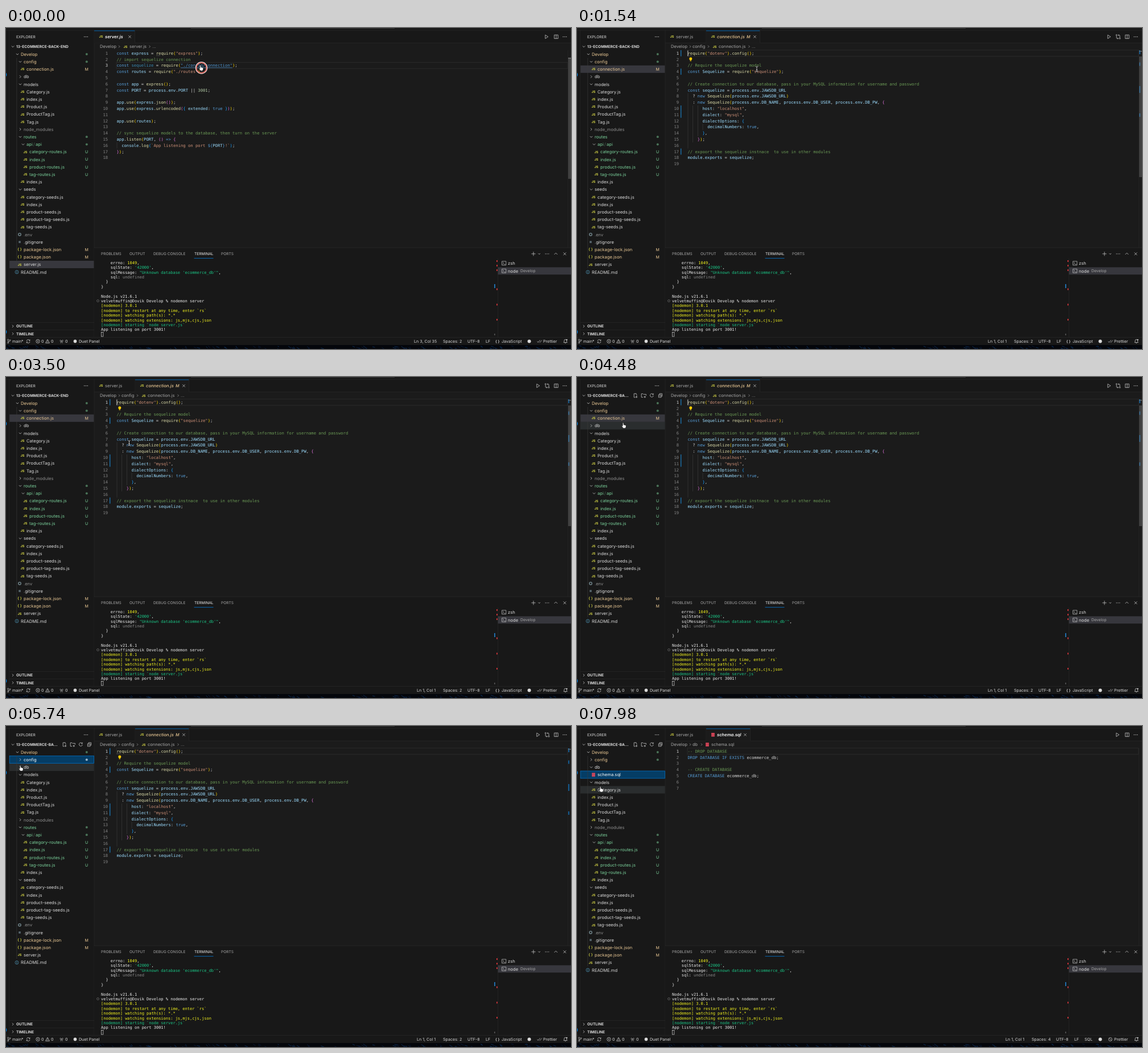
Recreate the animation shown at these times as an HTML page. Size 993x564 px, loop 8000 ms.

```html
<!DOCTYPE html>
<html lang="en">
<head>
<meta charset="utf-8">
<title>Editor walkthrough</title>
<style>
html, body { margin: 0; width: 100%; height: 100%; overflow: hidden; background: #181818; }
svg { display: block; width: 993px; height: 564px; }
text { font-family: Inter, "Open Sans", sans-serif; white-space: pre; text-rendering: geometricPrecision; }
.mono { font-family: "DejaVu Sans Mono", "Liberation Mono", monospace; }
</style>
</head>
<body>
<svg id="stage" viewBox="0 0 993 564"></svg>
<script>
const GREY = '#a6a6a6', LIGHT = '#dadada', YELLOW = '#e8c794', GREEN = '#7ad09a', BLUE = '#0078d4';
const LINE = '#2b2b2b', SIDE = '#181818', EDITOR = '#1b1b1b', JS = '#d6d646';
const ROW = 13.2, TOP = 39.4, CH = 4.334;

const esc = s => s.replace(/&/g, '&amp;').replace(/</g, '&lt;');
const raw = (x, y, s, fill, size = 7.6, attr = '') =>
  `<text x="${x}" y="${(y + size * .36).toFixed(2)}" font-size="${size}" fill="${fill}" ${attr}>${s}</text>`;
const txt = (x, y, s, ...rest) => raw(x, y, esc(s), ...rest);
const rect = (x, y, w, h, fill, attr = '') =>
  `<rect x="${x}" y="${y}" width="${w}" height="${h}" fill="${fill}" ${attr}/>`;
const path = (d, color = LIGHT, w = .7, fill = 'none') =>
  `<path d="${d}" stroke="${color}" stroke-width="${w}" fill="${fill}"/>`;
const dot = (x, y, r, fill, stroke = 'none', w = .7) =>
  `<circle cx="${x}" cy="${y}" r="${r}" fill="${fill}" stroke="${stroke}" stroke-width="${w}"/>`;
const group = (id, body, attr = '') => `<g id="${id}" ${attr}>${body}</g>`;

const down = (x, y, c = LIGHT, k = 2.2) => path(`M${x - k} ${y - k / 2}l${k} ${k} ${k} ${-k}`, c);
const right = (x, y, c = LIGHT, k = 2.2) => path(`M${x - k / 2} ${y - k}l${k} ${k} ${-k} ${k}`, c);
const cross = (x, y, k = 2.2, c = LIGHT) => path(`M${x - k} ${y - k}l${2 * k} ${2 * k}m0 ${-2 * k}l${-2 * k} ${2 * k}`, c);
const more = (x, y, c = LIGHT) => [-2.8, 0, 2.8].map(d => dot(x + d, y, .65, c)).join('');
const js = (x, y) => txt(x, y, 'JS', JS, 5.6, 'font-weight="700" text-anchor="middle"');
const brace = (x, y, c = JS) => txt(x, y - .3, '{ }', c, 6.4, 'font-weight="600" text-anchor="middle"');
const cylinder = (x, y) => [-2.2, 0, 2.2].map(d => rect(x - 3.1, y + d - .9, 6.2, 1.8, '#e5485d', 'rx=".8"')).join('') +
  rect(x - 2.7, y - 3, 5.4, 6, '#e5485d', 'opacity=".45"');

// ---- explorer tree: depth, kind, label, status ----
const tree = `0 v Develop m|1 v config m|2 j connection.js M|1 > db|2 q schema.sql|1 v models|2 j Category.js|2 j index.js
2 j Product.js|2 j ProductTag.js|2 j Tag.js|1 > node_modules -|1 v routes u|2 v api/api u|3 j category-routes.js U
3 j index.js U|3 j product-routes.js U|3 j tag-routes.js U|2 j index.js|1 v seeds|2 j category-seeds.js|2 j index.js
2 j product-seeds.js|2 j product-tag-seeds.js|2 j tag-seeds.js|1 g .env -|1 i .gitignore|1 b package-lock.json M
1 b package.json M|1 j server.js|0 r README.md`.split(/[|\n]/).map(s => s.split(' '));

const icons = {
  v: (x, y) => down(x + 1, y), '>': (x, y) => right(x + 1, y), j: js, b: brace, q: cylinder,
  g: (x, y) => dot(x, y, 2.2, 'none', '#6d8086', 1.5),
  i: (x, y) => rect(x - 1.8, y - 1.8, 3.6, 3.6, '#56656c'),
  r: (x, y) => dot(x, y, 3, 'none', '#519aba') + path(`M${x} ${y - .6}v2.3m0-3.8v.9`, '#519aba', .9)
};

function treeRows(configOpen, dbOpen, selected) {
  const rows = tree.filter(r => (configOpen || r[2] !== 'connection.js') && (dbOpen || r[2] !== 'schema.sql'));
  return rows.map(([depth, kind, label, mark = ''], i) => {
    const x = 26 + 5 * depth, y = 46 + ROW * i, picked = label === selected;
    if (label === 'config' && !configOpen || label === 'db') kind = label === 'db' && dbOpen ? 'v' : '>';
    const color = picked ? '#fff' : { m: YELLOW, M: YELLOW, u: GREEN, U: GREEN, '-': '#8c8c8c' }[mark] || LIGHT;
    const name = label.replace('/', '<tspan dx="1.3" opacity=".5">/</tspan><tspan dx="1.3">') + (label.includes('/') ? '</tspan>' : '');
    let end = '';
    if (/[MU]/.test(mark)) end = txt(141.7, y, mark, color, 7, 'text-anchor="middle"');
    else if (/[mu]/.test(mark)) end = dot(141.8, y, 2, picked ? '#9fb8cb' : '#4a7358');
    return icons[kind](x - 7, y) + raw(x, y, name, color) + end;
  }).join('');
}

// ---- code ----
const TOKEN = /(\/\/.*|-- .*)|("[^"]*"|`[^$]*|!`)|(\$\{|\}(?=!)|=>|\b(?:const|new|true|DROP|CREATE|DATABASE|IF|EXISTS)\b)|(\b\d+\b)|([A-Za-z_]\w*)|([()[\]{}])|(\s+|.)/g;
const PAIRS = ['#ffd700', '#da70d6', '#179fff'];

function wordColor(w, next, dim) {
  if (next === '(') return '#dcdcaa';
  if (dim === w) return '#3a89b2';
  return w === 'ecommerce_db' ? '#d4d4d4' : '#9cdcfe';
}

function code(src, active, dim) {
  let depth = 0;
  return src.split('\n').map((line, i) => {
    const y = 44.3 + 10.8 * i;
    const spans = [...line.matchAll(TOKEN)].map(m => {
      const [s, comment, str, key, num, word, pair] = m;
      let color = '#d4d4d4', attr = '';
      if (comment) color = '#6a9955';
      else if (str) {
        color = '#ce9178';
        if (s.includes('./config')) { color = '#4e94ce'; attr = ' text-decoration="underline"'; }
      }
      else if (key) color = '#569cd6';
      else if (num) color = '#b5cea8';
      else if (word) color = wordColor(s, line[m.index + s.length], dim);
      else if (pair) color = PAIRS[('([{'.includes(s) ? depth++ : --depth) % 3];
      return `<tspan fill="${color}"${attr}>${esc(s)}</tspan>`;
    }).join('');
    const no = txt(179.2, y, String(i + 1), i + 1 === active ? LIGHT : '#858585', 7.2, 'class="mono" text-anchor="end"');
    return no + raw(194.5, y, spans, LIGHT, 7.2, 'class="mono"');
  }).join('');
}
const lineTop = n => 38.9 + 10.8 * (n - 1);
const lineBox = n => rect(194, lineTop(n), 793, 10.8, 'none', 'stroke="#2a2a2a" stroke-width="1"');
const guide = (col, a, b) => rect(194.7 + col * CH, lineTop(a), .6, 10.8 * (b - a + 1), '#404040');
const hint = x => [0, 2.4, 4.8].map(d => rect(x + d, 48.2, 1, .9, '#8a8a8a')).join('');

const serverSrc = `const express = require("express");
// import sequelize connection
const sequelize = require("./config/connection");
const routes = require("./routes");

const app = express();
const PORT = process.env.PORT || 3001;

app.use(express.json());
app.use(express.urlencoded({ extended: true }));

app.use(routes);

// sync sequelize models to the database, then turn on the server
app.listen(PORT, () => {
  console.log(\`App listening on port \${PORT}!\`);
});
`;
const connSrc = `require("dotenv").config();

// Require the sequelize model
const Sequelize = require("sequelize");

// Create connection to our database, pass in your MySQL information for username and password
const sequelize = process.env.JAWSDB_URL
  ? new Sequelize(process.env.JAWSDB_URL)
  : new Sequelize(process.env.DB_NAME, process.env.DB_USER, process.env.DB_PW, {
      host: "localhost",
      dialect: "mysql",
      dialectOptions: {
        decimalNumbers: true,
      },
    });

// expoort the sequelize instnace  to use in other modules
module.exports = sequelize;
`;
const sqlSrc = `-- DROP DATABASE
DROP DATABASE IF EXISTS ecommerce_db;

-- CREATE DATABASE
CREATE DATABASE ecommerce_db;

`;

// ---- tabs, breadcrumbs, editor actions, status ----
const activeTab = (x, w) => rect(x, 4, w, 22.6, EDITOR) + rect(x, 4.5, w, .8, BLUE) +
  rect(x + w - .3, 4, .6, 22, LINE) + cross(x + w - 9, 15.4);
const idleTab = js(167, 15.4) + txt(174, 15.4, 'server.js', GREY) + rect(226.7, 4, .6, 22, LINE);
const italic = w => `font-style="italic" font-weight="${w}"`;
const play = x => path(`M${x - 2.2} 12.2v6.4l5-3.2z`);
const split = path('M963.6 12.2h6.6v6.4h-6.6zM966.9 12.2v6.4') + more(982, 15.4);
const compare = path('M948.2 13v4.4q0 1 1 1h2m-1-1.2l1.2 1.2-1.2 1.2M954 17.8v-4.2q0-1-1-1h-2m1.2-1.2l-1.2 1.2 1.2 1.2') +
  dot(948.2, 12.4, 1, EDITOR, LIGHT, .6) + dot(954, 18.4, 1, EDITOR, LIGHT, .6);
const crumbs = list => list.map(([x, s]) => s === '>' ? right(x, 32.6, GREY, 1.9) : txt(x, 32.6, s, GREY, 7.5)).join('');
const status = list => list.map(([x, s]) => txt(x, 550.4, s, LIGHT, 7.1)).join('');
const jsStatus = pos => status([pos, [768, 'Spaces: 2'], [811, 'UTF-8'], [843, 'LF'], [871, 'JavaScript']]) +
  brace(863.6, 550.6, LIGHT) + path('M933.6 550.6l1.6 1.8 3.4-4m-.8 4l.4.2 3.4-4');

const views = group('server', activeTab(155, 71.5) + js(167, 15.4) + txt(174, 15.4, 'server.js', '#fff', 7.6, italic(600)) +
  play(950) + split + crumbs([[165, 'Develop'], [199, '>'], [217, 'server.js'], [252.5, '>'], [257, '...']]) + js(210, 32.6) +
  lineBox(3) + guide(0, 16, 16) + code(serverSrc, 3, 'sequelize') + hint(264.5) + rect(988, 52.5, 5, 1, '#a0a0a0') +
  jsStatus([717, 'Ln 3, Col 35'])) +
group('conn', idleTab + activeTab(227, 94.5) + js(239, 15.4) + txt(246, 15.4, 'connection.js', YELLOW, 7.6, italic(500)) +
  txt(298, 15.4, 'M', YELLOW, 7.2, italic(500)) + play(935) + compare + split +
  crumbs([[165, 'Develop'], [199, '>'], [203, 'config'], [231, '>'], [249, 'connection.js'], [302.5, '>'], [307, '...']]) + js(242, 32.6) +
  lineBox(1) + guide(0, 8, 16) + guide(2, 10, 15) + guide(4, 10, 14) + guide(6, 13, 13) + code(connSrc, 1) + hint(195) +
  [1, 4, 10, 11, 17].map(n => rect(182, lineTop(n), 1.4, 10.8, '#1b6fa8')).join('') +
  [[39, 7], [60.5, 6], [102, 12], [150, 6]].map(([y, h]) => rect(988, y, 2.2, h, '#14588c')).join('') +
  rect(988, 40.5, 5, .9, '#8a8a8a') + jsStatus([722, 'Ln 1, Col 1'])) +
group('sql', idleTab + activeTab(227, 77.5) + cylinder(239, 15.4) + txt(246, 15.4, 'schema.sql', '#fff', 7.6, italic(600)) +
  play(950) + split + crumbs([[165, 'Develop'], [199, '>'], [203, 'db'], [219, '>'], [236, 'schema.sql']]) + cylinder(229, 32.6) +
  lineBox(1) + code(sqlSrc, 1) +
  status([[753, 'Ln 1, Col 1'], [799, 'Spaces: 4'], [842, 'UTF-8'], [874, 'LF'], [892, 'SQL']]) +
  dot(937.3, 550.5, 3, 'none', LIGHT) + path('M935.2 548.4l4.2 4.2'));

// ---- fixed parts ----
const Y = '#f2f21f', G = '#1bc586', W = '#ececec';
const shell = [
  [['    errno: ', W], ['1049', Y], [',', W]],
  [['    sqlState: ', W], ["'42000'", G], [',', W]],
  [['    sqlMessage: ', W], ['"Unknown database \'ecommerce_db\'"', G], [',', W]],
  [['    sql: ', W], ['undefined', '#8a8a8a']],
  [['  }', W]], [['}', W]], [],
  [['Node.js v21.6.1', W]],
  [['velvetmuffin@Dovik Develop % nodemon server', W]],
  [['[nodemon] 3.0.1', Y]],
  [['[nodemon] to restart at any time, enter `rs`', Y]],
  [['[nodemon] watching path(s): *.*', Y]],
  [['[nodemon] watching extensions: js,mjs,cjs,json', Y]],
  [['[nodemon] starting `node server.js`', G]],
  [['App listening on port 3001!', W]]
].map((line, i) => raw(167, 412.2 + 8.4 * i,
  line.map(([s, c]) => `<tspan fill="${c}">${esc(s)}</tspan>`).join(''), W, 7, 'class="mono"')).join('');

const prompt = (x, y) => path(`M${x - 3.6} ${y - 3.4}h7.2v6.8h-7.2zM${x - 2} ${y - 1.6}l1.7 1.6-1.7 1.6M${x + .4} ${y + 1.9}h1.8`, LIGHT, .65);

let seed = 7;
const rnd = () => (seed = seed * 16807 % 2147483647) / 2147483647;
const streaks = Array.from({ length: 130 }, () =>
  path(`M${(rnd() * 993).toFixed(1)} ${(558 + rnd() * 5).toFixed(1)}l${(2 + rnd() * 4).toFixed(1)} ${(1 + rnd() * 3).toFixed(1)}`,
    rnd() < .5 ? '#0f3464' : '#0b1f40', .8)).join('');

const frame = rect(0, 0, 993, 564, SIDE) + rect(325, 0, 358, 1, '#3a3a3a') +
  rect(155, 26, 838, 360, EDITOR) + rect(155, 4, 838, 22.3, SIDE) + rect(155, 25.8, 838, .6, LINE) +
  rect(0, 3.7, 993, .6, LINE) + rect(5.5, 4, .6, 539.5, LINE) + rect(154.7, 4, .6, 539.5, LINE) +
  dot(-2.6, 82, 4, BLUE) + dot(-2.6, 534, 4, BLUE) +
  txt(18, 15.4, 'EXPLORER', LIGHT, 6.6) + more(140.5, 15.4) + down(12, 32.6);

const bottom = rect(6, 517, 149, .6, LINE) + rect(6, 530.4, 149, .6, LINE) +
  right(12, 524) + txt(18, 524, 'OUTLINE', LIGHT, 6.6, 'font-weight="700"') +
  right(12, 537.2) + txt(18, 537.2, 'TIMELINE', LIGHT, 6.6, 'font-weight="700"') +
  rect(155, 386, 838, 157, SIDE) + rect(155, 385.7, 838, .7, LINE) +
  [[167, 'PROBLEMS'], [217, 'OUTPUT'], [259, 'DEBUG CONSOLE'], [331, 'TERMINAL'], [378, 'PORTS']]
    .map(([x, s]) => txt(x, 397, s, x === 331 ? '#f0f0f0' : GREY, 6.6)).join('') +
  rect(330.5, 404.3, 34, .8, BLUE) +
  path('M923.4 396.8h7.2m-3.6-3.6v7.2') + down(937.2, 396.8, LIGHT, 1.8) + more(951, 396.8) +
  path('M963.6 398l2.8-2.8 2.8 2.8') + cross(982, 396.8, 2.4) +
  shell + rect(167.3, 534.4, 3.6, 7.6, 'none', `stroke="${W}" stroke-width=".6"`) + dot(161.5, 479.4, 1.9, 'none', '#7a7a7a') +
  rect(864, 405, .6, 138.5, LINE) + rect(864.6, 420.4, 128.4, 12.8, '#37373d') +
  [408, 416, 424, 457.5, 484.5, 511].map(y => rect(862, y, 1.8, 3, '#d13438')).join('') +
  rect(858, 450, 1.8, 7, '#2277bb') + rect(858, 537, 1.6, 3, '#555') +
  prompt(875.2, 413.3) + txt(882, 413.3, 'zsh', LIGHT) + prompt(875.2, 426.8) + txt(882, 426.8, 'node', LIGHT) +
  txt(904, 427, 'Develop', GREY, 6.9) +
  rect(0, 543.2, 993, .6, LINE) + rect(0, 557, 993, 7, '#04060b') + streaks +
  status([[11, 'main*'], [62, '0'], [79, '0'], [104, '0'], [128, 'Duet Panel'], [944, 'Prettier']]) +
  path('M3.6 548.4v4M3.6 551.4q3.4 0 3.4-2.2') + dot(3.6, 547.6, 1, SIDE, LIGHT, .6) + dot(3.6, 553.2, 1, SIDE, LIGHT, .6) + dot(7, 548.6, 1, SIDE, LIGHT, .6) +
  path('M36.2 550a3 3 0 0 1 5.6-1m.2-1.6v2h-2M42 551a3 3 0 0 1-5.6 1m-.2 1.6v-2h2') +
  dot(56, 550.4, 3.2, 'none', LIGHT) + cross(56, 550.4, 1.3) +
  path('M73 547.2l3.4 6.2h-6.8zM73 549.4v2m0 .6v.7') +
  path('M97.6 549.6l-1.6 4.2M97.6 549.6l1.6 4.2M95.8 547.8q-1.2 1.8 0 3.6M99.4 547.8q1.2 1.8 0 3.6', LIGHT, .6) + dot(97.6, 549.4, .7, LIGHT) +
  dot(121.5, 550.4, 2.8, LIGHT) + dot(919.6, 550.4, 3, LIGHT) +
  path('M980.2 552.6h6l-.8-1.6v-1.6a2.2 2.2 0 0 0-4.4 0v1.6zM982.4 553.6h1.6') + dot(985.6, 547.8, 1.1, LIGHT);

const titleIcons = path('M104.6 29.2h-4.4v6.6h2.4M103 29.2l2 2v1.4M104.6 33.2v3.6m-1.8-1.8h3.6') +
  path('M116 35.6h-2.8v-6.2h2.6l1 1h4.6v2.4M119.2 33.2v3.6m-1.8-1.8h3.6') +
  path('M133.8 30.4a3 3 0 1 0 .6 2.4M134.2 28.8v2.2h-2.2') +
  path('M143.4 31.2h4.6v4.6h-4.6zM145 31v-1.8h4.6v4.6h-1.4M144.6 33.5h2.2');

const hand = path('M-2 -4.4c.8 0 1 .5 1 1v2.5c.4-.5 1.4-.4 1.5.3.4-.4 1.3-.2 1.4.5.5-.3 1.2 0 1.2.8v1.3c0 1.4-.8 2.2-1.1 3h-3.7c-.7-1.1-1.9-2.3-2.5-3.5-.3-.8.6-1.2 1.1-.6l.4.4v-4.7c0-.5.2-1 .7-1z', '#000', .5, '#fff');
const beamD = 'M-2 -4.4q2 0 2 1.4q0 -1.4 2 -1.4M0 -3v6.4M-2 4.8q2 0 2 -1.4q0 1.4 2 1.4M-1.2 1.2h2.4';

const stage = document.getElementById('stage');
stage.innerHTML = frame +
  rect(6, 0, 148.6, ROW, '#2a2d2e', 'id="hover"') + rect(6.2, 0, 148.2, ROW - .2, '#37373d', 'id="sel" stroke-width=".7"') +
  rect(18.6, 52.6, .6, 1, '#3c3c3c', 'id="indent"') +
  group('title', txt(18, 32.6, '13-ECOMMERCE-BACK-END', LIGHT, 6.6, 'font-weight="700"')) +
  group('titleHover', txt(18, 32.6, '13-ECOMMERCE-BA...', LIGHT, 6.6, 'font-weight="700"') + titleIcons) +
  group('treeA', treeRows(true, false)) + group('treeB', treeRows(false, false, 'config')) +
  group('treeC', treeRows(false, true, 'schema.sql')) +
  bottom + views + rect(987.3, 39, .5, 347, LINE) +
  rect(988, 0, 5, 212, '#797979', 'id="slider"') +
  group('bulb', dot(199.8, 54, 2.5, '#ffcc00') + rect(198.6, 56, 2.4, 2.4, '#ffcc00') + rect(198.6, 57, 2.4, .5, EDITOR)) +
  rect(194.4, 39.6, 1, 9.8, '#cccccc', 'id="caret"') +
  group('ring', dot(0, 0, 9.4, 'none', '#f4e9e7', 2.6) + dot(0, 0, 9, 'none', '#cf4740', 1.4)) +
  group('hand', hand) + group('beam', path(beamD, '#000', 1.8) + path(beamD, '#f4f4f4', .8));

// ---- timeline ----
const OPEN_CONN = 210, BULB = 980, COLLAPSE = 5390, EXPAND = 5880, OPEN_SQL = 6370;
const mouse = [
  [0, 343.5, 70], [910, 343.5, 70], [1260, 316, 72], [1820, 316, 72], [2030, 338, 42], [2380, 307, 122], [2660, 307, 122],
  [2940, 372, 228], [3200, 300, 222], [3430, 243, 160], [3570, 190, 72], [3850, 190, 72], [4060, 148, 152], [4300, 92, 114],
  [4480, 83, 85], [4690, 83, 85], [5250, 26, 60], [5530, 26, 60], [5740, 27, 74], [6160, 27, 74], [6370, 38, 88],
  [6720, 39, 89], [7280, 39, 89], [7630, 45, 139], [7980, 43, 111]
];
const rings = [[0, 140], [COLLAPSE, 5530], [5810, 5950], [6300, 6440]];
const caretOff = [[0, OPEN_CONN], [1050, 1540], [2660, 3150], [COLLAPSE, 8000]];

const el = id => document.getElementById(id);
const show = (id, on) => { el(id).style.display = on ? '' : 'none'; };
const set = (id, attrs) => { for (const k in attrs) el(id).setAttribute(k, attrs[k]); };
const within = (list, t) => list.some(([a, b]) => t >= a && t < b);

function mouseAt(t) {
  const i = mouse.findIndex(k => k[0] > t);
  if (i < 0) return mouse[mouse.length - 1].slice(1);
  const [a, x, y] = mouse[i - 1], [b, u, v] = mouse[i];
  const p = (t - a) / (b - a), e = p * p * (3 - 2 * p);
  return [x + (u - x) * e, y + (v - y) * e];
}

function render(time) {
  const t = Math.floor(time / 70) * 70;
  const [x, y] = mouseAt(t);
  const inSide = x < 154;
  const conn = t >= OPEN_CONN && t < OPEN_SQL;

  show('server', t < OPEN_CONN);
  show('conn', conn);
  show('sql', t >= OPEN_SQL);
  show('treeA', t < COLLAPSE);
  show('treeB', t >= COLLAPSE && t < EXPAND);
  show('treeC', t >= EXPAND);
  show('title', !inSide);
  show('titleHover', inSide);
  show('bulb', conn && t >= BULB);
  show('caret', !within(caretOff, t));

  const focused = t >= COLLAPSE;
  const sel = t < OPEN_CONN ? 28 : t < COLLAPSE ? 2 : t < EXPAND ? 1 : t < OPEN_SQL ? 2 : 3;
  set('sel', { y: TOP + ROW * sel, fill: focused ? '#053d65' : '#37373d', stroke: focused ? BLUE : 'none' });
  const row = Math.floor((y - 4 - TOP) / ROW);
  show('hover', inSide && row !== sel);
  set('hover', { y: TOP + ROW * row });
  set('indent', { height: ROW * (focused && t < EXPAND ? 27 : 28) });

  const fade = t < 4690 ? 1 : Math.max(0, 1 - (t - 4690) / 770);
  set('slider', { y: t < OPEN_CONN ? 53 : 50, opacity: .4 * fade });

  const link = t < OPEN_CONN, at = `translate(${x.toFixed(2)} ${y.toFixed(2)})`;
  show('ring', within(rings, t));
  show('hand', inSide || link);
  show('beam', !inSide && !link);
  ['ring', 'hand', 'beam'].forEach(id => set(id, { transform: at }));
}

function tick() {
  render(performance.now() % 8000);
  requestAnimationFrame(tick);
}
tick();
</script>
</body>
</html>
```
